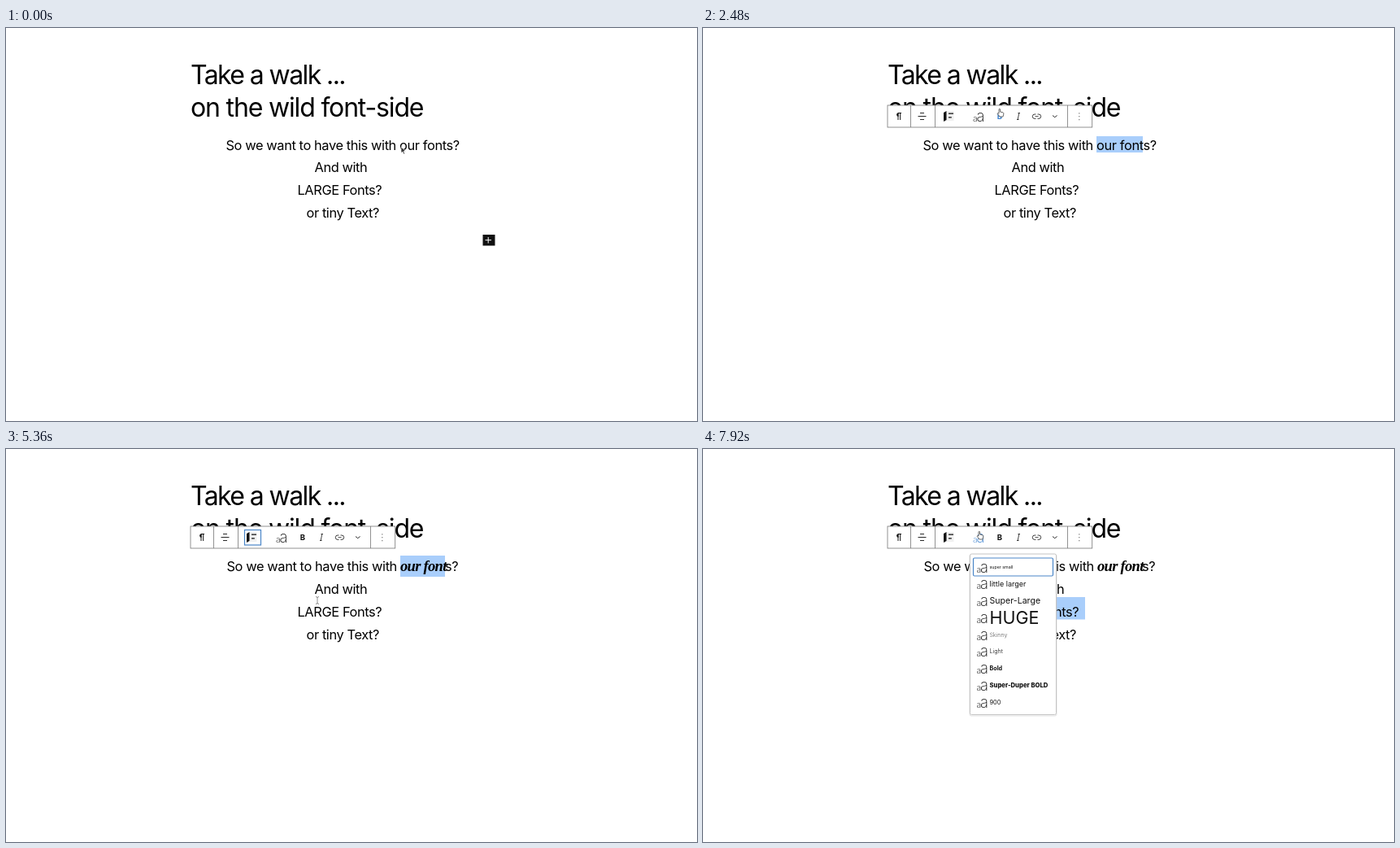
Write an HTML page that moves like this. It is 850 by 483 pixels and loops after 8000 ms.

```html
<!DOCTYPE html>
<html lang="en">
<head>
<meta charset="utf-8">
<title>Font toolbar</title>
<style>
  html, body { margin: 0; width: 100%; height: 100%; overflow: hidden; background: #fff; }
  svg { display: block; width: 850px; height: 483px; font-family: Inter, sans-serif; color: #111; }
  text { fill: currentColor; white-space: pre; }
  .title { font-size: 32px; letter-spacing: -1.17px; font-weight: 370; color: #000; }
  .title .tight { letter-spacing: -1.6px; }
  .body { font-size: 16.4px; letter-spacing: -.4px; color: #000; }
  .script { font: italic bold 18.5px "Liberation Serif", serif; letter-spacing: -.7px; }
  .line { fill: none; stroke: currentColor; }
  .soft { color: #777; }
  .panel { fill: #fff; stroke: #c4c4c4; }
  .focus { fill: #fff; stroke: #4a86c8; stroke-width: 1.2; }
  .hot { color: #3f83cf; }
</style>
</head>
<body>
<svg viewBox="0 0 850 483">
  <defs>
    <g id="fIcon">
      <path d="M3.5 0H12.5V12H3.5Z" fill="#f0f0f0"/>
      <path d="M0 2 3.5 0V11L0 13Z" fill="currentColor"/>
      <path d="M6 3.2H12M6 7.8H9.8" class="line" stroke-width="1.3"/>
    </g>
    <g id="aIcon" font-weight="200">
      <text y="13" font-size="10.5">a</text>
      <text x="4.6" y="13" font-size="18.5">a</text>
    </g>
  </defs>

  <rect id="selection" fill="#a9cefb"/>
  <g class="title">
    <text x="227" y="68.5" class="tight">Take a walk ...</text>
    <text x="227" y="108.5">on the wild font-side</text>
  </g>
  <g class="body">
    <text id="plain" x="270.5" y="149.5">So we want to have this with our fonts?</text>
    <g id="styled">
      <text x="271.5" y="149.5">So we want to have this with</text>
      <text x="485" y="149.5" class="script">our font</text>
      <text x="540" y="149.5">s?</text>
    </g>
    <g id="rest">
      <text x="379.5" y="177.3">And with</text>
      <text x="358.5" y="205">LARGE Fonts?</text>
      <text x="369.5" y="232.7">or tiny Text?</text>
    </g>
  </g>
  <g id="plus">
    <rect x="586.5" y="254" width="15" height="13.5" fill="#111"/>
    <path d="M589.5 260.7H597M593.2 257V264.5" stroke="#fff"/>
  </g>

  <g id="toolbar">
    <rect x="227" y="95" width="251.7" height="27" fill="#fff" stroke="#777" stroke-width=".8"/>
    <path d="M255.5 95V122M285.5 95V122M448.5 95V122" class="line soft" stroke-width=".8"/>
    <path d="M240 113V104.5H244M242.7 104.5V113" class="line" stroke-width="1"/>
    <path d="M240.5 104.2A2.4 2.4 0 0 0 240.5 109Z" fill="#111"/>
    <path d="M267 104.5H272M264.5 108.5H274.5M267 112.5H272" class="line" stroke-width=".9"/>
    <rect id="iconFocus" x="293.5" y="99.5" width="20" height="18.5" class="focus"/>
    <use id="fTool" href="#fIcon" x="296" y="102"/>
    <use id="aTool" href="#aIcon" x="332" y="101.5"/>
    <text id="bold" x="361.8" y="112.2" font-size="9.5" font-weight="700">B</text>
    <path d="M387.5 104.5H390M386 112.5H388.5M388.8 104.5 387.2 112.5" class="line" stroke-width=".8"/>
    <path d="M409.5 106H408A2.7 2.7 0 0 0 408 111.4H409.5M411.5 106H413A2.7 2.7 0 0 1 413 111.4H411.5M408.5 108.7H412.5"
      class="line" stroke-width=".8"/>
    <path d="M430 107.5 432.7 109.7 435.5 107.5" class="line" stroke-width=".9"/>
    <path d="M462.8 104.2V114" class="line soft" stroke-width="1.2" stroke-dasharray="1.2 2.7"/>
  </g>
  <g id="fontMenu"></g>
  <g id="sizeMenu"></g>

  <g id="pointer">
    <path id="arrow" d="M0 0V7.5L1.8 6 3.2 9 4.5 8.4 3.2 5.5H5.5Z" fill="#333" stroke="#fff" stroke-width=".6"/>
    <path id="hand" d="M2 6V.8Q2.8 -.3 3.6 .8V4L7.2 4.9Q8 5.2 7.8 7L7 10H3L.2 6.3Q.2 5 2 6Z"
      fill="#fff" stroke="#444" stroke-width=".8"/>
    <path id="beam" d="M-2 -4.5Q0 -4.5 0 -3Q0 -4.5 2 -4.5M0 -3V3M-2 4.5Q0 4.5 0 3Q0 4.5 2 4.5"
      class="line soft" stroke-width=".8"/>
  </g>
</svg>
<script>
const LOOP = 8000, STEP = 80;
const $ = id => document.getElementById(id);
const show = (id, on) => $(id).style.display = on ? "" : "none";
const set = (id, attrs) => { for (const k in attrs) $(id).setAttribute(k, attrs[k]); };

// Each item: label, font size, extra text attributes
const serif = 'font-family="Liberation Serif, serif"';
const fontItems = [
  ["Note", 8.5, serif + ' font-style="italic" font-weight="700"'],
  ["Engraved", 6.9, serif + ' fill-opacity=".8"'],
  ["Edgie", 7, serif + ' font-weight="700"'],
  ["Outline", 7.8, 'font-family="Noto Serif, serif" font-weight="700" style="fill:#fff;stroke:#888;stroke-width:.5"'],
  ["STENCIL", 7, 'font-family="Liberation Sans, sans-serif" font-weight="700" letter-spacing="-1"']
];
const sizeItems = [
  ["super small", 5.3, ""], ["little larger", 9, ""], ["Super-Large", 10.6, ""], ["HUGE", 21.5, ""],
  ["Skinny", 7.2, 'font-weight="250"'], ["Light", 7.2, 'font-weight="300"'], ["Bold", 7.2, 'font-weight="700"'],
  ["Super-Duper BOLD", 7.7, 'font-weight="800"'], ["900", 7.4, ""]
];

function buildMenu(id, x, width, height, icon, iconX, textX, items) {
  const rows = items.map(([label, size, attrs], i) => {
    const y = 145 + i * 20.75;
    return `<use href="#${icon}" x="${iconX}" y="${y - 6.5}"/>
      <text x="${textX}" y="${y + size * .36}" font-size="${size}" ${attrs}>${label}</text>`;
  });
  $(id).innerHTML = `<rect class="panel" x="${x - .5}" y="129.5" width="${width + 1}" height="${height + 1}" rx="2" opacity=".5"/>
    <rect class="panel" x="${x}" y="129" width="${width}" height="${height}" rx="2"/>
    <rect class="focus" x="${x + 4}" y="134" width="${width - 8}" height="22" rx="1.5"/>` + rows.join("");
}
buildMenu("fontMenu", 292.5, 64, 114, "fIcon", 301, 316, fontItems);
buildMenu("sizeMenu", 328.5, 106, 197.5, "aIcon", 336.5, 352.5, sizeItems);

// Pointer path: time, x, y
const path = [
  [0, 486, 146], [800, 486, 146], [1440, 543, 146], [1760, 543, 146], [2400, 362, 99], [2640, 362, 99],
  [3120, 299, 111], [3600, 299, 111], [4000, 322, 221], [4320, 322, 180], [4560, 322, 143], [4720, 322, 143],
  [5280, 383, 186], [5440, 383, 186], [5840, 359, 201], [6080, 359, 201], [6400, 451, 200], [6640, 470, 200],
  [7040, 470, 200], [7680, 337, 101], [8000, 337, 101]
];
function pointerAt(t) {
  const i = path.findIndex(p => p[0] > t);
  const [t0, x0, y0] = path[i - 1], [t1, x1, y1] = path[i];
  const u = (t - t0) / (t1 - t0), e = u * u * (3 - 2 * u);
  return [x0 + (x1 - x0) * e, y0 + (y1 - y0) * e];
}

function select(x, end, y, height) {
  set("selection", { x, y, height, width: Math.max(0, end - x) });
}

function draw(t) {
  const [x, y] = pointerAt(t);
  const styled = t >= 4720;
  const fontOpen = t >= 3280 && !styled;
  const inBar = y < 118 && t > 1760;

  show("plus", t < 480);
  $("toolbar").style.opacity = t < 480 ? 0 : t < 560 ? .5 : 1;
  show("plain", !styled);
  show("styled", styled);
  set("rest", { transform: `translate(0 ${styled ? 1 : 0})` });

  const snapped = (from, step) => from + Math.floor((x - from) / step) * step;
  if (t < 880) select(0, 0, 0, 0);
  else if (t < 4720) select(484, snapped(484, 9.5) < 541 && t < 1440 ? snapped(484, 9.5) : 541, 133, 20);
  else if (t < 6000) select(485, 540, 131, 26);
  else select(359, t >= 6640 ? 470 : snapped(359, 9.44), 182, 27.5);

  show("iconFocus", styled && t < 6000);
  $("fTool").classList.toggle("hot", inBar && x > 290 && x < 315);
  $("aTool").classList.toggle("hot", inBar && x > 325 && x < 350);
  $("bold").classList.toggle("hot", inBar && x > 355 && x < 375);

  show("fontMenu", fontOpen);
  show("sizeMenu", t >= 7840);
  const grow = t < 7920 ? .7 : 1;
  set("sizeMenu", { transform: `translate(381 129) scale(${grow}) translate(-381 -129)` });

  const overMenu = fontOpen && y > 129;
  const hand = inBar || overMenu;
  const beam = !hand && t > 4720;
  show("hand", hand);
  show("beam", beam);
  show("arrow", !hand && !beam);
  set("pointer", { transform: `translate(${x} ${y})` });
}

function tick() {
  draw(Math.floor(performance.now() % LOOP / STEP) * STEP);
  requestAnimationFrame(tick);
}
tick();
</script>
</body>
</html>
```
